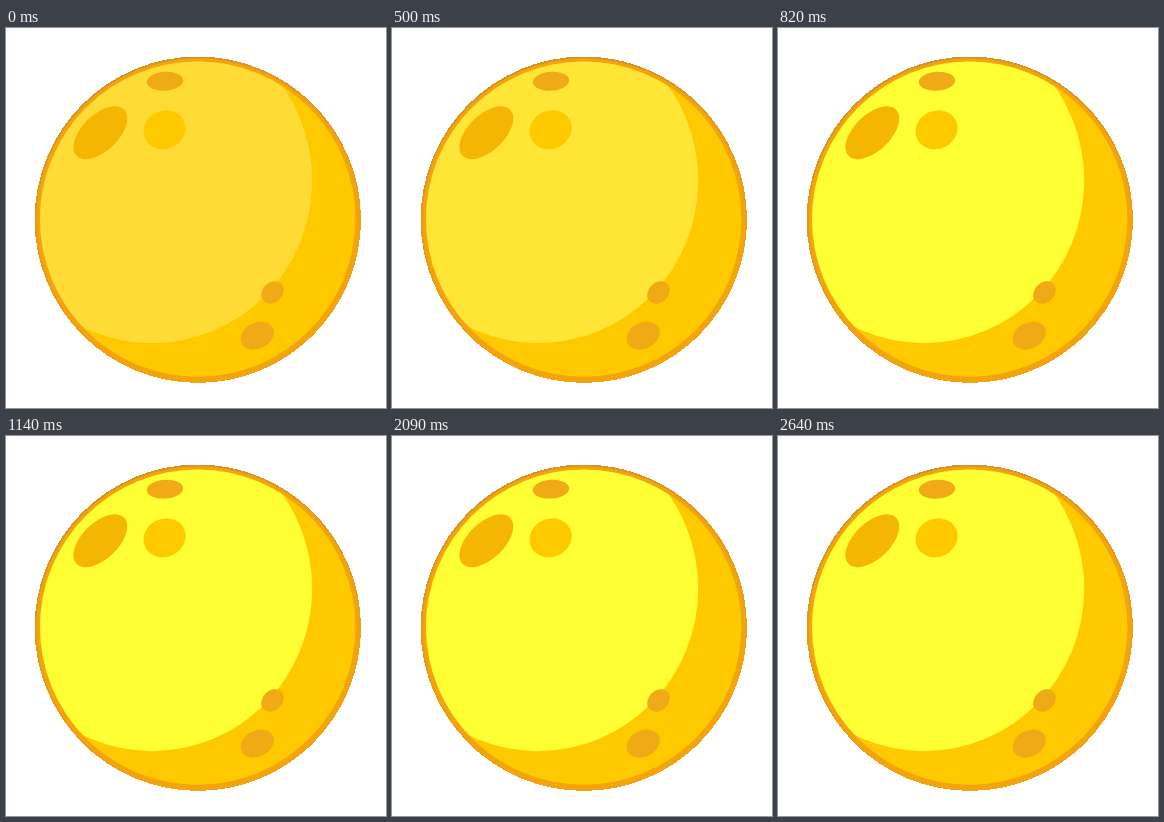
These frames come from a looping animation (380 px wide and 380 px high, 2690 ms). An HTML page:

```html
<!DOCTYPE html>
<html lang="en">
<head>
<meta charset="utf-8">
<title>Moon</title>
<style>
  html, body { margin: 0; width: 100%; height: 100%; overflow: hidden; background: #fff; }
  svg { display: block; width: 100%; height: 100%; }
  .edge { fill: url(#dusk); shape-rendering: crispEdges; }
  .rim { fill: #f3a40d; }
  .shade { fill: #ffc900; }
  .lit { fill: #ffdb36; animation: glow 2690ms linear infinite; }
  .crater { fill: #efaa16; }
  .deep { fill: #f4b503; }

  /* Slow warm-up, quick brightening, then a hold until the hard restart */
  @keyframes glow {
    0% { fill: #ffdb36; }
    18.6% { fill: #ffe636; }
    22% { fill: #fffa34; }
    25.3%, 100% { fill: #ffff33; }
  }
</style>
</head>
<body>
<svg viewBox="0 0 380 380">
  <defs>
    <linearGradient id="dusk" x1=".3" y1="0" x2=".7" y2="1">
      <stop offset="0" stop-color="#cf932a"/>
      <stop offset=".8" stop-color="#f0a40f"/>
    </linearGradient>
    <clipPath id="disc"><circle cx="191.7" cy="191.1" r="157.7"/></clipPath>
  </defs>
  <circle class="edge" cx="191.8" cy="191.7" r="163.2"/>
  <circle class="rim" cx="191.8" cy="191.7" r="161.4"/>
  <g clip-path="url(#disc)">
    <rect class="shade" width="380" height="380"/>
    <ellipse class="lit" cx="146" cy="152.5" rx="160.2" ry="162.7"/>
  </g>
  <ellipse class="crater" rx="18.2" ry="9.4" transform="translate(159 53.2) rotate(-4)"/>
  <ellipse class="deep" rx="33.2" ry="18" transform="translate(94.3 104.8) rotate(-44)"/>
  <ellipse class="shade" rx="21.5" ry="19" transform="translate(158.6 101.8) rotate(-25)"/>
  <ellipse class="crater" rx="12.5" ry="10" transform="translate(266.5 264.5) rotate(-45)"/>
  <ellipse class="crater" rx="17.5" ry="13" transform="translate(251.2 307.6) rotate(-28)"/>
</svg>
</body>
</html>
```
